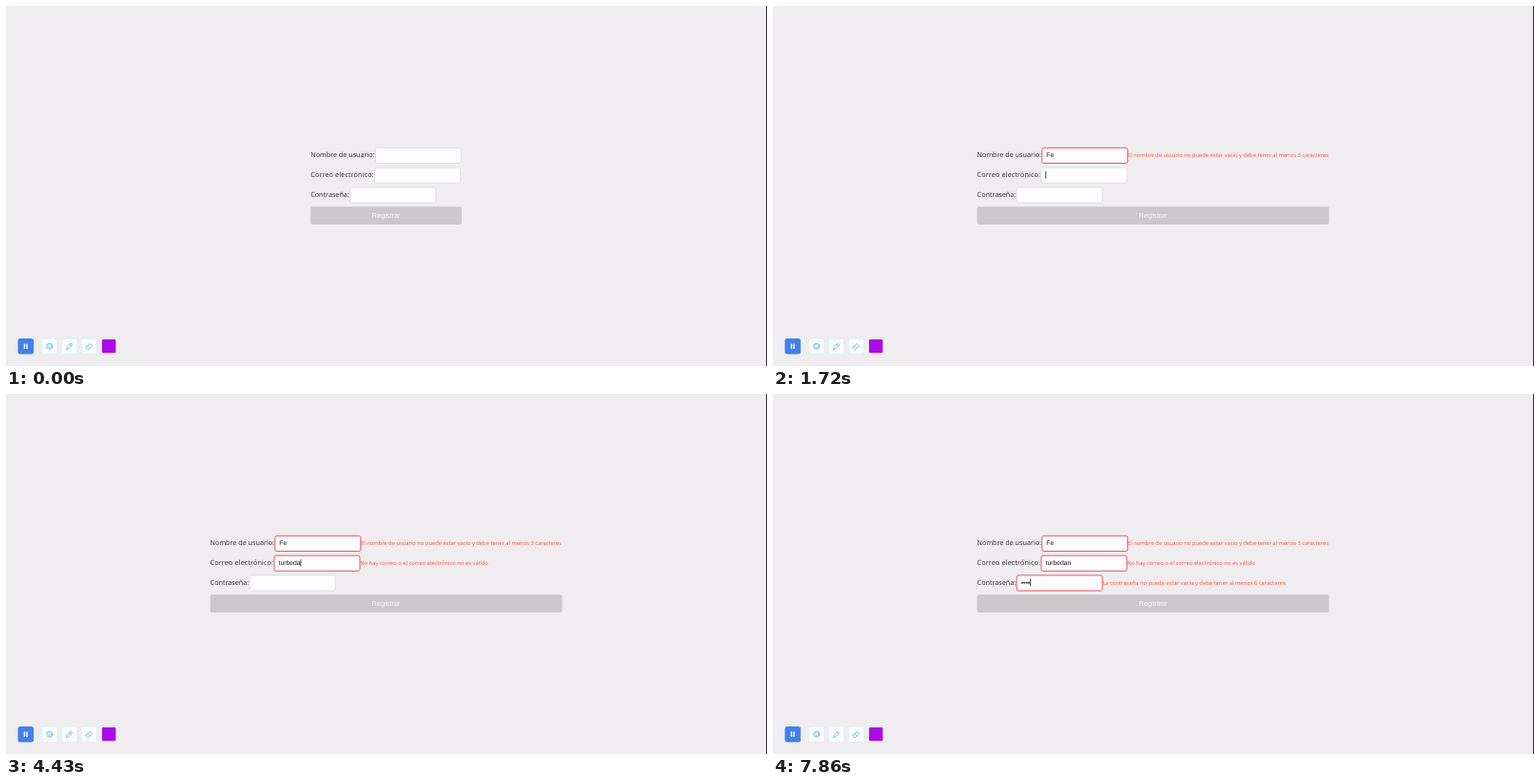
Animation, 800 px wide and 379 px high, one loop 8000 ms. Source, as an HTML page:

```html
<!DOCTYPE html>
<html lang="es">
<head>
<meta charset="utf-8">
<title>Registro</title>
<style>
  html, body { margin: 0; width: 100%; height: 100%; overflow: hidden; background: #efedef; }
  svg { display: block; width: 100vw; height: 100vh; }
  text { text-rendering: geometricPrecision; white-space: pre; }
  .label { font: 7.23px "Open Sans", sans-serif; fill: #2b292b; }
  .error { font: 5.79px "Open Sans", sans-serif; fill: #f2513a; }
  .value { font: 6.8px "Liberation Sans", Arial, sans-serif; fill: #1c1a1c; }
  .button { font: 7.4px "Liberation Sans", Arial, sans-serif; fill: #fbfafb; text-anchor: middle; }
  .tool { fill: #f8fcfe; stroke: #deebf1; stroke-width: .6; }
  .icon { fill: none; stroke: #58b5e6; stroke-width: .8; stroke-linejoin: round; stroke-linecap: round; }
</style>
</head>
<body>
<svg id="stage" viewBox="0 0 800 379" preserveAspectRatio="none">
  <rect width="800" height="379" fill="#efedef"/>
  <rect x="799" width="1" height="379" fill="#2b2931"/>
  <g id="form"></g>
  <rect id="submit" y="211.2" height="18.8" rx="2" fill="#cac8ca"/>
  <text class="button" x="399.6" y="223">Registrar</text>

  <rect x="12.5" y="350" width="16.6" height="16.6" rx="2.5" fill="#4280ea"/>
  <path d="M19.4 355.4v5.6M22 355.4v5.6" stroke="#fff" stroke-width="1.4"/>
  <rect class="tool" x="37.7" y="350.2" width="16.2" height="16.2" rx="2"/>
  <rect class="tool" x="58.6" y="350.2" width="16.2" height="16.2" rx="2"/>
  <rect class="tool" x="79.4" y="350.2" width="16.2" height="16.2" rx="2"/>
  <g class="icon">
    <circle cx="45.8" cy="358.3" r="3.1"/>
    <path d="M44.2 356.8h.2M46 356h.2M47.4 357.2h.2M44 358.8c1-.8 2 .2 1.8 1.6M47 359h1"/>
    <path d="M63.7 361.4l.6-2.2 3.7-3.9 1.6 1.5-3.8 4zM67 356.3l1.6 1.5"/>
    <path d="M84.5 359.1l3-3.1q.7-.7 1.4 0l1.1 1.1q.7.7 0 1.4l-3 3q-.7.6-1.4 0l-1.1-1.1q-.6-.7 0-1.3zM86 357.5l2.5 2.5"/>
  </g>
  <rect x="101" y="351" width="14.4" height="14.2" rx="1" fill="#aa0de6"/>
</svg>
<script>
const LOOP = 8000;
const NARROW = 320.2, WIDE = 214.6;
const $ = id => document.getElementById(id);

function add(parent, name, attrs, text = "") {
  const el = document.createElementNS("http://www.w3.org/2000/svg", name);
  for (const key in attrs) el.setAttribute(key, attrs[key]);
  el.textContent = text;
  return parent.appendChild(el);
}

// Keys hold [time, typed length]; focus is the span in which the caret is shown.
const fields = [
  { label: "Nombre de usuario:", left: 68.2, top: 149.3, spacing: 0,
    error: "El nombre de usuario no puede estar vacío y debe tener al menos 3 caracteres", errorSpacing: 0,
    text: "Fe", keys: [[140, 1], [430, 2]], focus: [140, 1570], off: [[1000, 1430]] },
  { label: "Correo electrónico:", left: 67.4, top: 170.1, spacing: .135,
    error: "No hay correo o el correo electrónico no es válido", errorSpacing: .026,
    text: "turbedan",
    keys: [[3430, 1], [3720, 2], [3860, 3], [4140, 5], [4290, 6], [4430, 7], [4860, 8]],
    focus: [1570, 6290], off: [[2140, 2720], [3290, 3430], [5430, 5860]] },
  { label: "Contraseña:", left: 41.6, top: 190.9, spacing: 0,
    error: "La contraseña no puede estar vacía y debe tener al menos 6 caracteres", errorSpacing: .025,
    text: "••••", keys: [[7570, 2], [7860, 4]], focus: [6290, LOOP], off: [[6860, 7290]] }
];

for (const f of fields) {
  const base = f.top + 10.1;
  add($("form"), "text", { class: "label", y: base, "letter-spacing": f.spacing }, f.label);
  f.box = add($("form"), "rect", { x: f.left, y: f.top, width: 90, height: 16.2, rx: 2, fill: "#fdfcfe" });
  f.value = add($("form"), "text", { class: "value", x: f.left + 4.5, y: base });
  f.caret = add($("form"), "rect", { y: f.top + 4, width: .8, height: 7.4, fill: "#1c1a1c" });
  f.message = add($("form"), "text",
    { class: "error", x: f.left + 90.2, y: f.top + 9.9, "letter-spacing": f.errorSpacing }, f.error);
}

const within = (t, [start, end]) => t >= start && t < end;

function drawField(f, t) {
  const count = f.keys.reduce((n, [time, length]) => t >= time ? length : n, 0);
  f.value.textContent = f.text.slice(0, count);
  f.box.setAttribute("stroke", count ? "#ea5560" : "#d8d6d9");
  f.box.setAttribute("stroke-width", count ? 1 : .7);
  f.message.style.display = count ? "" : "none";
  const blink = within(t, f.focus) && !f.off.some(span => within(t, span));
  f.caret.style.display = blink ? "" : "none";
  f.caret.setAttribute("x", f.left + 4.4 + (count ? f.value.getComputedTextLength() : 0));
}

function draw(t) {
  const left = t < 140 ? NARROW : WIDE;
  $("form").setAttribute("transform", `translate(${left} 0)`);
  $("submit").setAttribute("x", left);
  $("submit").setAttribute("width", 2 * (399.6 - left));
  fields.forEach(f => drawField(f, t));
}

const start = performance.now();
function tick() {
  draw((performance.now() - start) % LOOP);
  requestAnimationFrame(tick);
}
tick();
</script>
</body>
</html>
```
